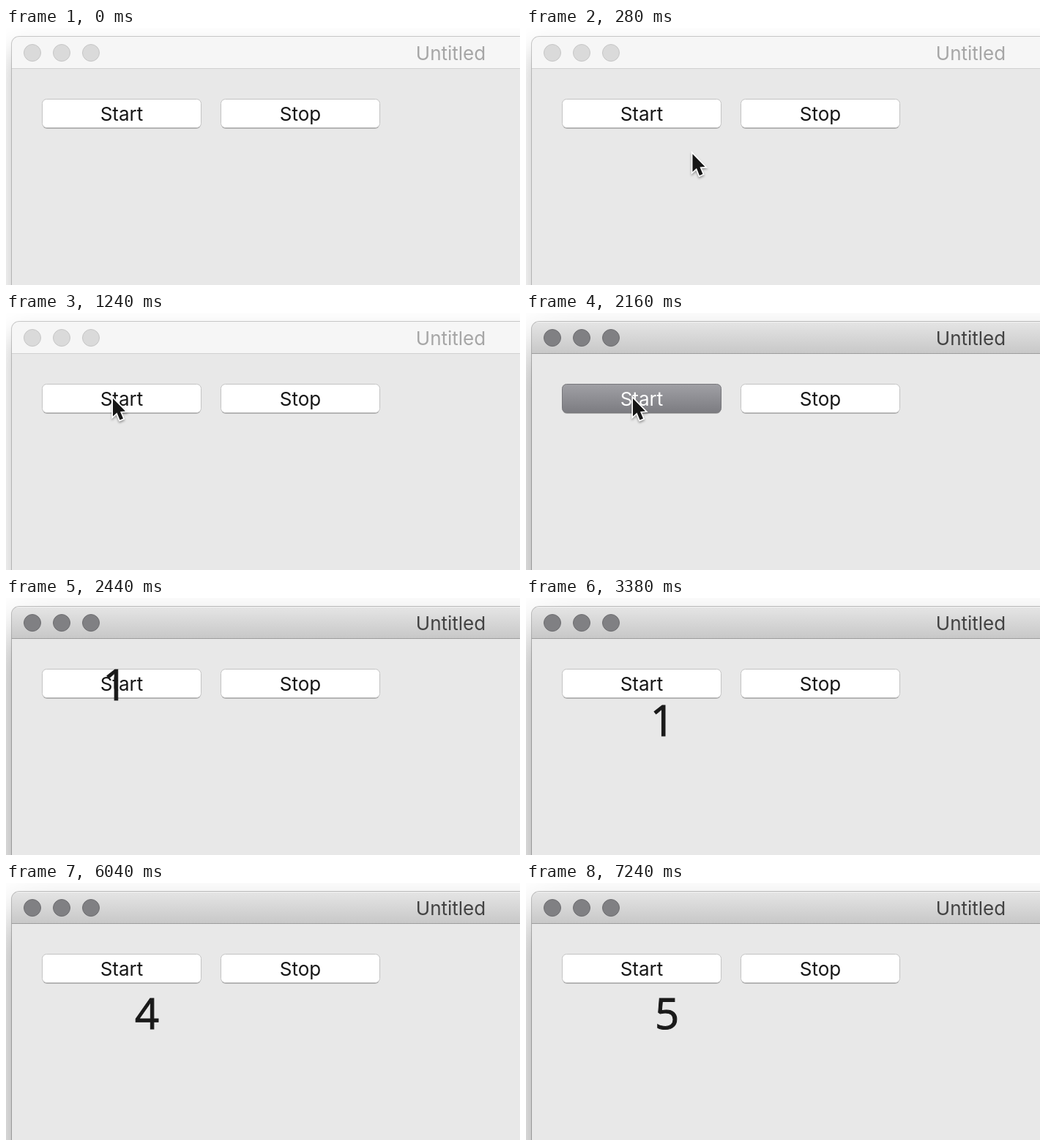
These frames come from a looping animation (702x352 px, 8000 ms). An HTML page:

```html
<!DOCTYPE html>
<html lang="en">
<head>
<meta charset="utf-8">
<title>Counter cursor</title>
<style>
  html, body { margin: 0; width: 100%; height: 100%; overflow: hidden; background: #fff; }
  #stage { position: relative; width: 702px; height: 352px; overflow: hidden; }
  #win {
    position: absolute; left: 8px; top: 12px; width: 1200px; height: 700px;
    border-radius: 10px; overflow: hidden; background: #e8e8e8;
    box-shadow: 0 0 0 1px rgba(0, 0, 0, .2), 0 20px 36px rgba(0, 0, 0, .25);
  }
  #bar { height: 43px; background: #f6f6f6; border-bottom: 1px solid #d1d1d1; }
  svg { position: absolute; left: 0; top: 0; }
  text { text-anchor: middle; }
  .label { font: 26px Inter, sans-serif; fill: #161616; }
  #title { fill: #a6a6a6; }
  .light { fill: #dadada; stroke: #c6c6c6; }
  .face { fill: #fff; stroke: #c3c3c3; }
  #digit {
    font: 58px "Open Sans", "Noto Sans", sans-serif;
    fill: #1a1a1a; stroke: #1a1a1a; stroke-width: 1;
  }
  #arrow { filter: drop-shadow(0 2px 1.5px rgba(0, 0, 0, .35)); }

  .active #win { box-shadow: 0 0 0 1px rgba(0, 0, 0, .25), 0 36px 60px rgba(0, 0, 0, .42); }
  .active #bar {
    background: linear-gradient(#e5e5e5, #c8c8c8); border-color: #9c9c9c;
    box-shadow: inset 0 1px #f3f3f3;
  }
  .active #title { fill: #424242; }
  .active .light { fill: #808083; stroke: #6d6d70; }
  .pressed #start .face { fill: url(#press); stroke: #77777b; }
  .pressed #start .label { fill: #fff; }
</style>
</head>
<body>
<div id="stage">
  <div id="win"><div id="bar"></div></div>
  <svg width="702" height="352">
    <defs>
      <linearGradient id="press" x2="0" y2="1">
        <stop stop-color="#a0a0a5"/><stop offset="1" stop-color="#7c7c81"/>
      </linearGradient>
    </defs>
    <circle class="light" cx="36" cy="34" r="11.5"/>
    <circle class="light" cx="76" cy="34" r="11.5"/>
    <circle class="light" cx="116" cy="34" r="11.5"/>
    <text id="title" class="label" x="607.5" y="44">Untitled</text>
    <g id="start">
      <rect x="50" y="99" width="216" height="39" rx="6" fill="#a9a9a9"/>
      <rect class="face" x="49.5" y="97.5" width="217" height="39" rx="6"/>
      <text class="label" x="158" y="127">Start</text>
    </g>
    <g>
      <rect x="294" y="99" width="216" height="39" rx="6" fill="#a9a9a9"/>
      <rect class="face" x="293.5" y="97.5" width="217" height="39" rx="6"/>
      <text class="label" x="402" y="127">Stop</text>
    </g>
    <text id="digit"></text>
    <g id="arrow">
      <path d="M0 0V24.5L5.5 19.5L9.5 29.5L14 27.5L10 18L17 17.5Z"
        fill="#161616" stroke="#fff" stroke-width="3.4" paint-order="stroke"/>
    </g>
  </svg>
</div>
<script>
const LOOP = 8000, STEP = 20;
const ENTER = 40, PRESS = 2160, RELEASE = 2260;
const TICKS = [RELEASE, 3460, 4660, 5860, 7040];

const stage = document.getElementById('stage');
const arrow = document.getElementById('arrow');
const digit = document.getElementById('digit');

const progress = (t, from, to) => Math.min(1, Math.max(0, (t - from) / (to - from)));
const mix = (a, b, p) => a + (b - a) * p;
const smooth = p => p * p * (3 - 2 * p);
const easeOut = (p, power) => 1 - (1 - p) ** power;
const place = (el, x, y) => el.setAttribute('transform', `translate(${x.toFixed(2)} ${y.toFixed(2)})`);

function arrowAt(t) {
  const p = progress(t, ENTER, 520);
  const settle = smooth(progress(t, 720, 860));
  const nudge = t >= 1020 ? 1 : 0;
  return [
    mix(331, 144, smooth(p ** 0.9)) + 2 * settle,
    mix(348, 107, easeOut(p, 1.88)) + 9 * settle + nudge
  ];
}

function digitAt(t) {
  const p = progress(t, 3180, 3640);
  return [mix(149, 192.5, easeOut(p, 3.4)), mix(139.5, 199.5, easeOut(p, 3))];
}

function draw(t) {
  const count = TICKS.filter(tick => t >= tick).length;
  stage.classList.toggle('active', t >= PRESS);
  stage.classList.toggle('pressed', t >= PRESS && t < RELEASE);
  arrow.style.display = t >= ENTER && !count ? '' : 'none';
  place(arrow, ...arrowAt(t));
  digit.textContent = count || '';
  place(digit, ...digitAt(t));
}

const begin = performance.now();
function tick() {
  const t = (performance.now() - begin) % LOOP;
  draw(Math.floor(t / STEP) * STEP);
  requestAnimationFrame(tick);
}
tick();
</script>
</body>
</html>
```
